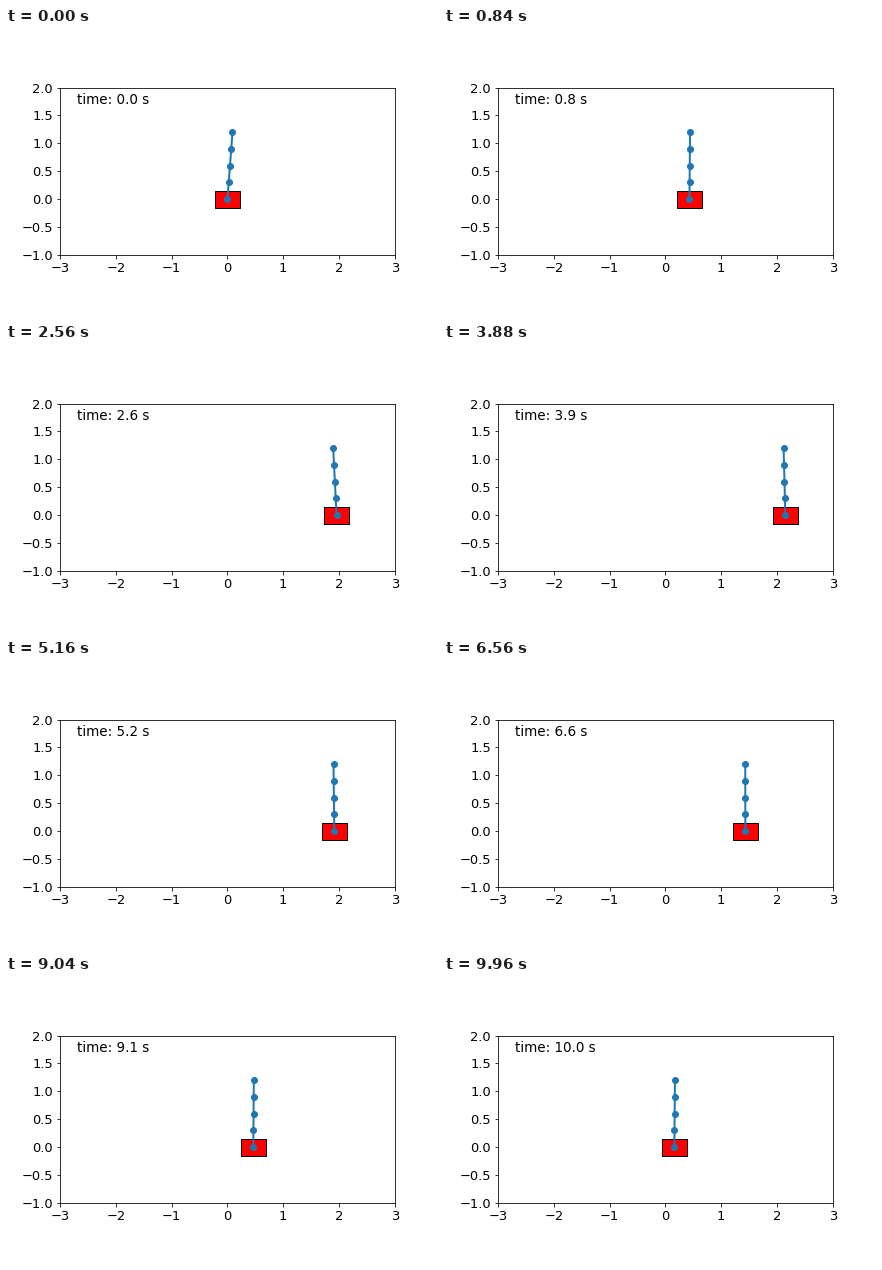
Animation, 432 px wide and 288 px high, one loop 10 s. Source, as a matplotlib script:

```python
import numpy as np
import matplotlib.pyplot as plt
from matplotlib.animation import FuncAnimation
from matplotlib.patches import Rectangle

FRAMES, INTERVAL = 250, 40
LINKS, LINK_LENGTH = 4, 0.3
CART_W, CART_H = 0.45, 0.3

plt.rcParams.update({"font.family": "DejaVu Sans", "font.size": 13})


def bell(t, center, width):
    return np.exp(-((t - center) / width) ** 2)


def cart_position(t):
    """Slow damped swing back to zero, minus the start-up transient."""
    swing = 3.885 * np.exp(-0.136 * t) * np.cos(0.283 * (t - 5.02))
    start = (0.58 + 2.17 * t + 2.95 * t ** 2) * np.exp(-2 * t)
    return swing - start - 0.055 * bell(t, 1, 0.4)


def rod_lean(t):
    """Lean to the right in radians: quick fall to the left, slow recovery."""
    recovery = -0.137 * np.exp(-0.2 * t) * (1 - t / 6.8)
    return recovery + 0.212 * bell(t, 0, 1.04)


times = np.linspace(0, 10, FRAMES)
reach = LINK_LENGTH * np.arange(LINKS + 1)

fig = plt.figure(figsize=(6, 4), dpi=72, facecolor="white")
fig.subplots_adjust(left=0.125, right=0.9, bottom=0.125, top=0.88)
ax = fig.add_subplot(xlim=(-3, 3), ylim=(-1, 2), aspect="equal")
ax.set_xticks(np.arange(-3, 4))
ax.set_yticks(np.arange(-1, 2.1, 0.5))

clock = ax.text(0.05, 0.9, "", fontsize=13.5, transform=ax.transAxes)
cart = ax.add_patch(Rectangle((-CART_W / 2, -CART_H / 2), CART_W, CART_H,
                              facecolor="red", edgecolor="black"))
rod, = ax.plot([], [], color="C0", lw=2, marker="o", markersize=6)


def draw(frame):
    t = times[frame]
    x, angle = cart_position(t), rod_lean(t)
    clock.set_text(f"time: {t:.1f} s")
    cart.set_x(x - CART_W / 2)
    rod.set_data(x + reach * np.sin(angle), reach * np.cos(angle))
    return clock, cart, rod


anim = FuncAnimation(fig, draw, frames=FRAMES, interval=INTERVAL, repeat=True)
plt.show()
```
